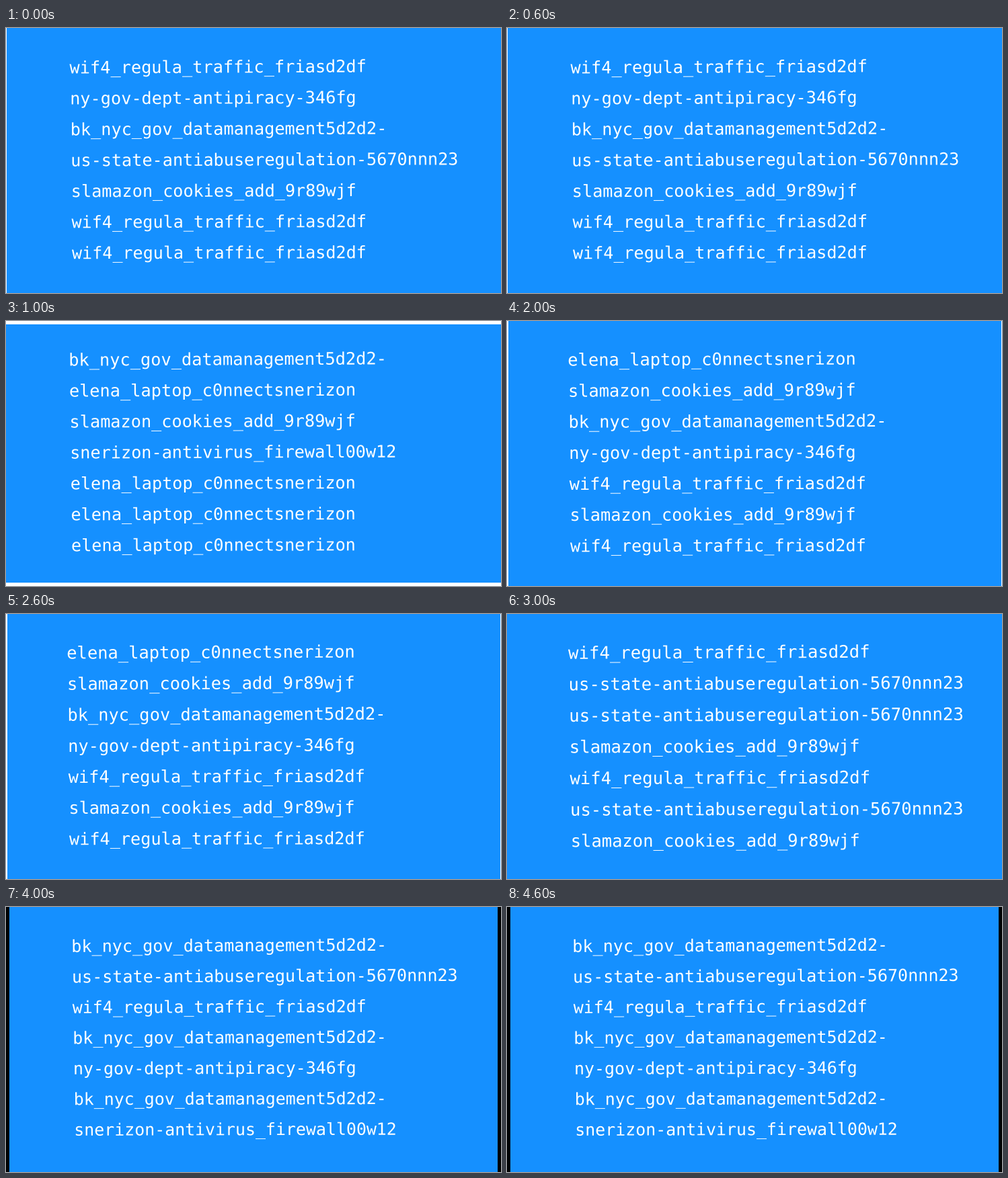
An HTML page that plays this animation: 736x394 px, repeating every 5000 ms.

```html
<!DOCTYPE html>
<html lang="en">
<head>
<meta charset="utf-8">
<title>Network names</title>
<style>
  html, body { margin: 0; width: 100%; height: 100%; overflow: hidden; }
  svg { display: block; width: 100vw; height: 100vh; }
  text {
    font-family: "DejaVu Sans Mono", monospace;
    fill: #fff;
    white-space: pre;
    text-rendering: geometricPrecision;
  }
</style>
</head>
<body>
<svg viewBox="0 0 736 394" preserveAspectRatio="none">
  <rect id="edge" width="736" height="394"/>
  <rect id="panel" fill="#1590ff"/>
  <g id="lines"></g>
</svg>
<script>
const HOLD = 1000;
const ADVANCE = 0.602; // glyph advance in em
const ROWS = 7;

const names = {
  w: 'wif4_regula_traffic_friasd2df',
  n: 'ny-gov-dept-antipiracy-346fg',
  b: 'bk_nyc_gov_datamanagement5d2d2-',
  u: 'us-state-antiabuseregulation-5670nnn23',
  s: 'slamazon_cookies_add_9r89wjf',
  f: 'snerizon-antivirus_firewall00w12',
  l: 'elena_laptop_c0nnectsnerizon',
};

// x, y and advance run from the first row to the last;
// panel is [left, top, right, bottom].
const scenes = [
  { rows: 'wnbusww', x: [94.6, 98], y: [67.6, 343.2], advance: [15.23, 15.11],
    edge: '#fff', panel: [1, 0, 736, 394] },
  { rows: 'blsflll', x: [93.3, 97.1], y: [66.6, 342.2], advance: [15.25, 15.1],
    edge: '#fff', panel: [0, 5, 736, 389] },
  { rows: 'lsbnwsw', x: [90.3, 94.1], y: [66.6, 343.2], advance: [15.31, 15.17],
    edge: '#fff', panel: [2, 0, 735, 394] },
  { rows: 'wuuswus', x: [91, 94.7], y: [66.8, 346.3], advance: [15.48, 15.37],
    edge: '#1590ff', panel: [0, 0, 736, 394] },
  { rows: 'buwbnbf', x: [97.3, 101.3], y: [67, 339.8], advance: [15.13, 14.99],
    edge: '#000', panel: [5, 0, 731, 394] },
];
const tilt = [-0.27, -0.14];

const byId = id => document.getElementById(id);
const mix = ([a, b], k) => a + (b - a) * k;
const setAttrs = (node, attrs) => {
  for (const key in attrs) node.setAttribute(key, attrs[key]);
};

const lines = Array.from({ length: ROWS }, () => byId('lines').appendChild(
  document.createElementNS('http://www.w3.org/2000/svg', 'text')));

let current = null;

function draw(time) {
  const scene = scenes[Math.floor(time / HOLD) % scenes.length];
  if (scene === current) return;
  current = scene;

  const [left, top, right, bottom] = scene.panel;
  setAttrs(byId('edge'), { fill: scene.edge });
  setAttrs(byId('panel'), { x: left, y: top, width: right - left, height: bottom - top });

  lines.forEach((line, i) => {
    const k = i / (ROWS - 1);
    line.textContent = names[scene.rows[i]];
    setAttrs(line, {
      'font-size': mix(scene.advance, k) / ADVANCE,
      transform: `translate(${mix(scene.x, k)} ${mix(scene.y, k)}) rotate(${mix(tilt, k)})`,
    });
  });
}

const start = performance.now();
function tick() {
  draw(performance.now() - start);
  requestAnimationFrame(tick);
}
tick();
</script>
</body>
</html>
```
